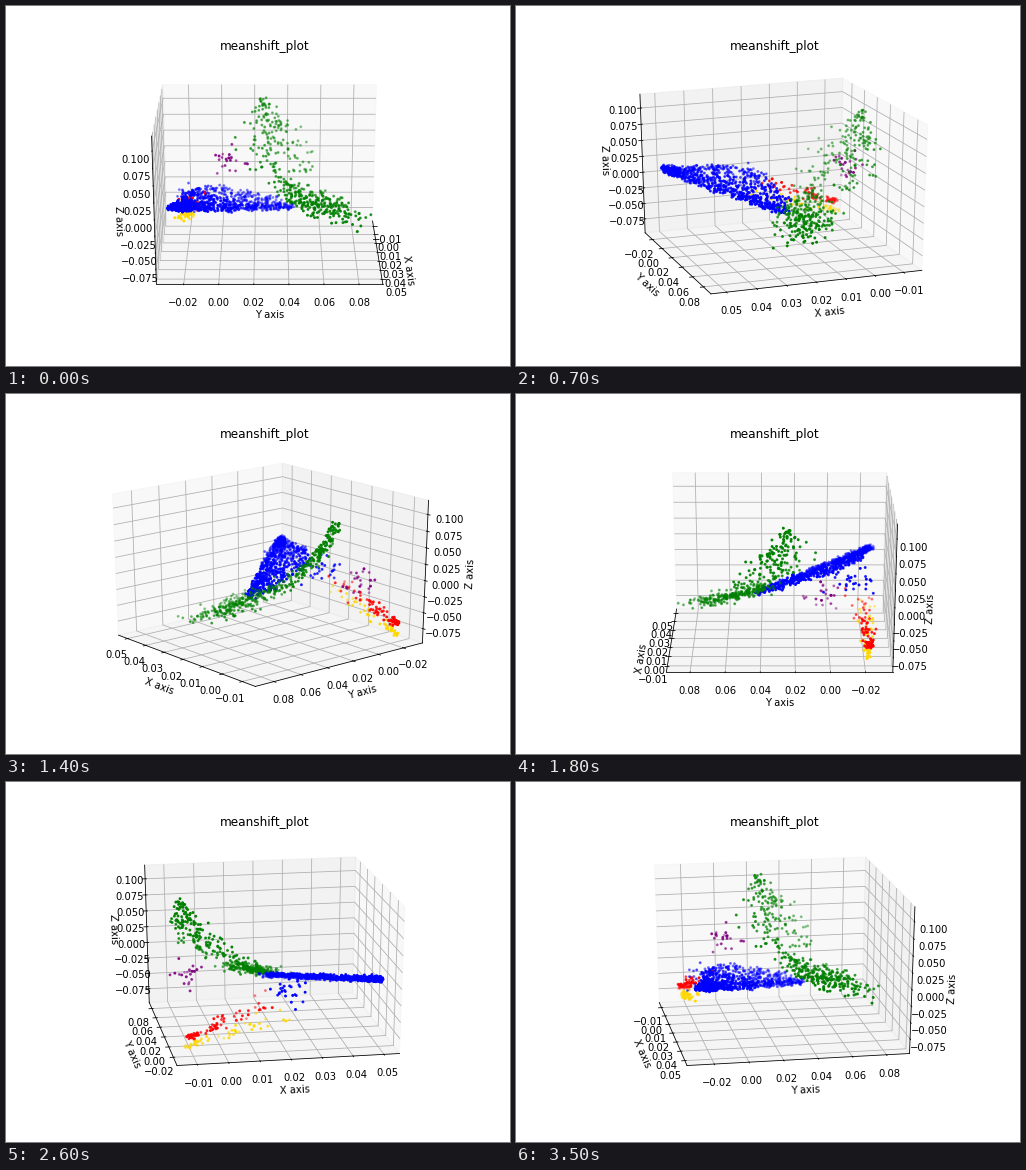
Animation, 504 px wide and 360 px high, one loop 3.6 s. Source, as a matplotlib script:

```python
import numpy as np
import matplotlib.pyplot as plt
from matplotlib.animation import FuncAnimation
from matplotlib.collections import LineCollection
from matplotlib.colors import to_rgb
from matplotlib.patches import Polygon

plt.rcParams["font.family"] = "DejaVu Sans"
plt.rcParams["text.kerning_factor"] = 6

FRAMES, ELEV, DIST = 36, np.radians(22), 10
W, H = 504, 360
BOX = np.array([0.125, 0.125, 0.775, 0.755])
rng = np.random.default_rng(7)

# The plotted volume is a unit cube centred on the origin.
EDGE, DELTA = 0.5 + 1 / 48, 1 / 12
PER_POINT = 48 / (BOX[2] * W + BOX[3] * H)
TICK_PAD = 11.5 * PER_POINT * DELTA
LABEL_PAD = 25 * PER_POINT * DELTA


def project(pts, azim):
    """Perspective view; returns screen x, screen y and distance."""
    x, y, z = np.moveaxis(np.asarray(pts, float), -1, 0)
    c, s = np.cos(azim), np.sin(azim)
    ce, se = np.cos(ELEV), np.sin(ELEV)
    h = c * x + s * y
    dist = DIST - (ce * h + se * z)
    return np.stack([(c * y - s * x) / dist, (ce * z - se * h) / dist, dist], axis=-1)


class Axis:
    def __init__(self, index, name, lo, hi, step, digits, shade):
        self.i, self.side = index, 1 if index == 0 else 0
        values = step * np.arange(np.ceil(lo / step), np.floor(hi / step) + 1)
        self.ticks = (values - lo) / (hi - lo) - 0.5
        self.pane = ax.add_patch(Polygon(np.zeros((4, 2)), color=(shade,) * 3,
                                         alpha=0.5, lw=1, zorder=1, clip_on=False))
        self.grid = self.strokes("#b0b0b0", 2)
        self.marks = self.strokes("k", 3)
        self.line, = ax.plot([], [], "k", lw=0.8, zorder=3, clip_on=False)
        self.label = ax.text(0, 0, name, size=10, ha="center", va="center",
                             rotation_mode="anchor", zorder=3)
        self.texts = [ax.text(0, 0, f"{v + 0.0:.{digits}f}".replace("-", "\u2212"),
                              size=10, ha="center", va="top", zorder=3)
                      for v in values]

    def strokes(self, color, zorder):
        lines = LineCollection([], colors=color, linewidths=0.8,
                               zorder=zorder, clip_on=False)
        return ax.add_collection(lines, autolim=False)

    def outward(self, pts, pad):
        moved = pts + np.where(pts < 0, -pad, pad)
        moved[..., self.i] = pts[..., self.i]
        return moved

    def update(self, azim, high):
        i, n = self.i, len(self.ticks)
        a, b = (i + 1) % 3, (i + 2) % 3
        far = np.where(high, EDGE, -EDGE)
        near = -far

        corners = np.tile(far, (4, 1))
        corners[1:3, a] = near[a]
        corners[2:, b] = near[b]
        self.pane.set_xy(project(corners, azim)[:, :2])

        ends = np.tile(far, (2, 1))
        ends[:, self.side] = near[self.side]
        ends[1, i] = near[i]
        flat = project(ends, azim)[:, :2]
        self.line.set_data(*flat.T)

        dx, dy = (flat[1] - flat[0]) * BOX[2:] * (W, H)
        angle = np.degrees(np.arctan2(dy, dx)) % 180
        self.label.set_rotation(angle - 180 if angle > 90 else angle)
        mid = self.outward(ends.mean(axis=0), LABEL_PAD)
        self.label.set_position(project(mid, azim)[:2])

        path = np.tile(far, (n, 3, 1))
        path[:, :, i] = self.ticks[:, None]
        path[:, 0, a] = near[a]
        path[:, 2, b] = near[b]
        self.grid.set_segments(project(path, azim)[..., :2])

        base = np.tile(ends[0], (n, 1))
        base[:, i] = self.ticks
        mark = np.stack([base, base], axis=1)
        sign = 1 if high[self.side] else -1
        mark[:, 0, self.side] += 0.1 * sign * DELTA
        mark[:, 1, self.side] -= 0.2 * sign * DELTA
        self.marks.set_segments(project(mark, azim)[..., :2])
        for text, pos in zip(self.texts, project(self.outward(base, TICK_PAD), azim)):
            text.set_position(pos[:2])


def view_basis(azim):
    """Right, up and toward-viewer directions."""
    c, s = np.cos(azim), np.sin(azim)
    ce, se = np.cos(ELEV), np.sin(ELEV)
    return np.array([[-s, c, 0], [-se * c, -se * s, ce], [ce * c, ce * s, se]])


# Blue and green spread as sheets seen edge-on from this direction.
SHEET = view_basis(np.radians(220))


def blob(center, spread, n):
    return rng.normal(center, spread, (n, 3))


def streak(start, end, n, power):
    """Line of points, dense at its start and looser toward its end."""
    t = rng.random((n, 1)) ** power
    line = np.array(start) + t * np.subtract(end, start)
    return line + rng.normal(0, 1, (n, 3)) * (0.012 + 0.02 * t)


def blue_sheet(n):
    w = rng.random(n) ** 1.45
    p = 0.62 - 0.7 * w
    low = -0.05 - 0.1 * np.sqrt(w)
    top = -0.04 + 0.18 * np.sin(np.pi * w) ** 1.4
    s = low + (top - low) * rng.random(n) ** (1 + 1.5 * w)
    q = 0.207 * p - 0.119
    return np.stack([p, q, s], axis=-1) @ SHEET + rng.normal(0, 0.009, (n, 3))


def green_arc(n):
    t = rng.random((n, 1))
    peak, bend, foot = np.array([(-0.42, -0.036, 0.44), (-0.36, 0.03, 0.05),
                                 (-0.05, 0.12, -0.13)])
    arc = (1 - t) ** 2 * peak + 2 * t * (1 - t) * bend + t ** 2 * foot
    drift = rng.normal(0, 0.13, (n, 1)) * np.sin(np.pi * t) * (0.4, -0.8, 0.2)
    return arc + drift + rng.normal(0, 0.015, (n, 3))


def green_foot(n):
    t = rng.beta(2, 2.2, (n, 1))
    line = np.array([0.02, 0.09, -0.15]) + t * (-0.1, 0.34, -0.08)
    return line + rng.normal(0, 0.085, (n, 1)) * SHEET[2] + rng.normal(0, 0.016, (n, 3))


fig = plt.figure(figsize=(W / 72, H / 72), dpi=72, facecolor="white")
ax = fig.add_axes(BOX)
ax.axis("off")
fig.text(BOX[0] + BOX[2] / 2, 316 / H, "meanshift_plot", size=12, ha="center")

axes = [
    Axis(0, "X axis", -0.01495, 0.05365, 0.01, 2, 0.95),
    Axis(1, "Y axis", -0.0330, 0.0910, 0.02, 2, 0.90),
    Axis(2, "Z axis", -0.0932, 0.1168, 0.025, 3, 0.925),
]

clusters = {
    "blue": np.vstack([blue_sheet(800), blob((0.03, -0.35, -0.1), 0.06, 26)]),
    "green": np.vstack([green_arc(200), green_foot(220)]),
    "red": streak((-0.44, -0.414, -0.365), (-0.06, -0.376, -0.16), 75, 2.6),
    "gold": streak((-0.45, -0.41, -0.43), (0.02, -0.39, -0.25), 48, 2.0),
    "purple": blob((-0.41, -0.19, -0.01), 0.045, 22),
}
dots = {color: ax.scatter(*np.zeros((2, len(pts))), s=3, lw=1.2, clip_on=False)
        for color, pts in clusters.items()}
ax.set_xlim(-0.095, 0.09)
ax.set_ylim(-0.095, 0.09)


def draw(frame):
    azim = 2 * np.pi * frame / FRAMES
    eye = np.array([np.cos(azim), np.sin(azim), np.sin(ELEV)])
    high = eye < -1e-9
    for axis in axes:
        axis.update(azim, high)
    for color, pts in clusters.items():
        flat = project(pts, azim)
        depth = -1 / flat[:, 2]
        depth = -depth if depth.mean() > 0 else depth
        fade = 1 - 0.7 * (depth - depth.min()) / np.ptp(depth)
        rgba = np.column_stack([np.tile(to_rgb(color), (len(pts), 1)), fade])
        dot = dots[color]
        dot.set_offsets(flat[:, :2])
        dot.set_facecolor(rgba)
        dot.set_edgecolor(rgba)
        dot.set_zorder(20 - flat[:, 2].min())
    return []


anim = FuncAnimation(fig, draw, frames=FRAMES, init_func=lambda: [],
                     interval=100, repeat=True, cache_frame_data=False)
plt.show()
```
